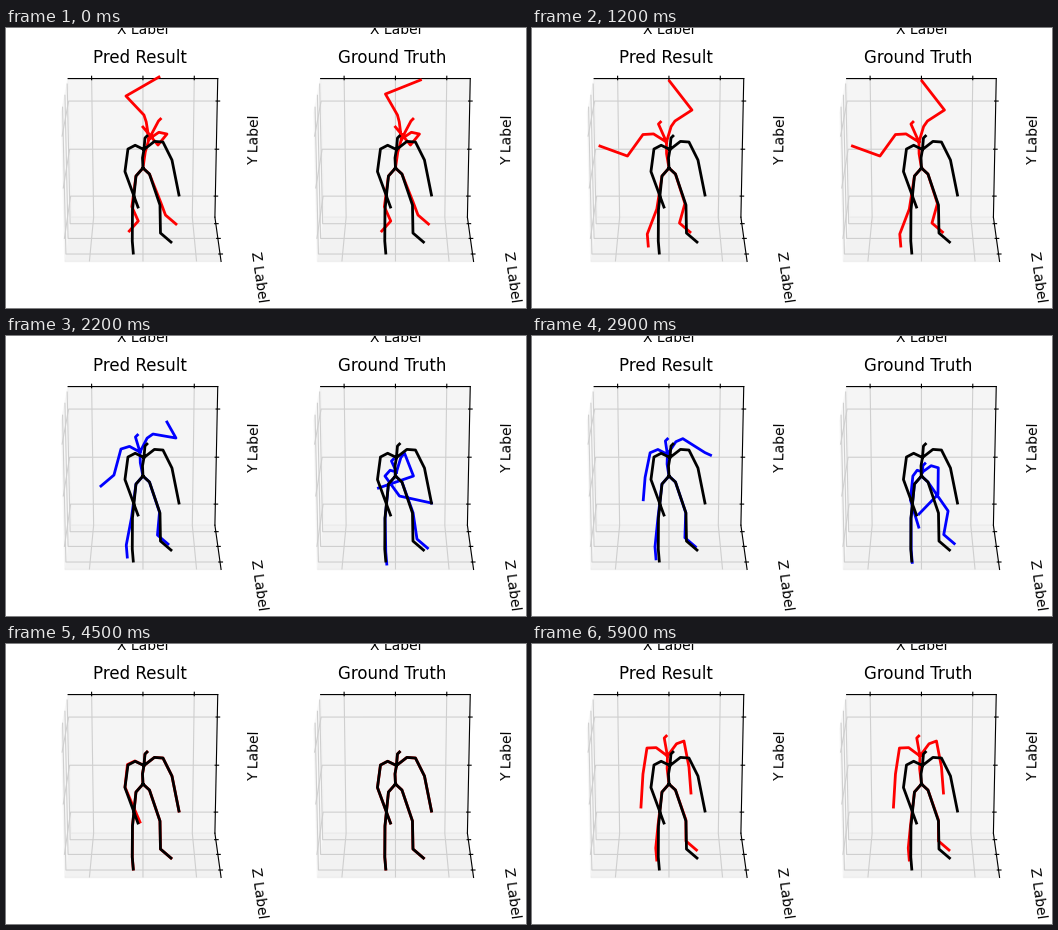
A matplotlib script that plays this animation: 520x280 px, repeating every 6 s.

```python
import numpy as np
import matplotlib.pyplot as plt
from matplotlib.animation import FuncAnimation

W, H, DPI = 520, 280, 100
FRAMES, INTERVAL = 60, 100
GAP = range(15, 45)              # the filled-in stretch, drawn blue

MARGIN, SIDE = 15, 237.5         # square panels, one margin apart
BOTTOM = 18
ELEV, AZIM = 110, -90.01
HALF = 76.4                      # half box width; one unit is one pixel
TICK = 0.686

plt.rcParams.update({"font.family": "DejaVu Sans", "grid.color": "#cfcfcf"})


def lerp(a, b, u):
    return np.asarray(a, float) * (1 - u) + np.asarray(b, float) * u


# ---- poses ----------------------------------------------------------------
# Control points relative to the hips, y up. An arm is shoulder, elbow, hand;
# steps move the feet away from the standing stance.
L_ARM, R_ARM = slice(2, 5), slice(5, 8)


def pose(chest, neck, l_arm, r_arm, l_step=(0, 0), r_step=(0, 0),
         l_heel=(0, 0), r_knee=(0, 0)):
    return np.array([chest, neck, *l_arm, *r_arm,
                     l_step, r_step, l_heel, r_knee], float)


def with_arm(base, arm, points):
    out = base.copy()
    out[arm] = points
    return out


target = pose((1, 18.5), (2, 30),
              [(-15, 19), (-18, -3.5), (-5, -39)],
              [(20, 26), (29, 8), (36, -27)])

raised = pose((6, 29), (15.5, 47),
              [(24, 34), (15, 23), (0, 41)],
              [(1, 53), (-17, 72), (16, 91)],
              l_step=(-4, 22), r_step=(5, 18), l_heel=(10, -2))
raised_true = with_arm(raised, R_ARM, [(2, 53), (-10, 74), (25, 88)])

swung = pose((-2.5, 26), (-10.5, 44),
             [(-26, 33.5), (-41.5, 12), (-69, 22)],
             [(6, 47), (23, 58), (0.5, 87)],
             l_step=(-11, 7), r_step=(-7, 10))

pred_mid = pose((-3, 24), (-7.5, 39),
                [(-22, 27), (-29, 1), (-42, -10)],
                [(10, 42), (33, 38), (24, 54)],
                l_step=(-6, 4), r_step=(-3, 6))
pred_late = with_arm(lerp(pred_mid, target, 0.75), R_ARM,
                     [(17, 33), (37, 14), (50, -5)])
pred_end = with_arm(target, L_ARM, [(-15.5, 19.5), (-18, -3), (-3, -38)])

true_mid = pose((1, 4), (-4, 15),
                [(-10.5, 0), (4, -20), (36, -27)],
                [(9, 23), (18, 0), (-17, -12)],
                l_step=(1, -3), r_step=(4, 2))
true_late = pose((1, 4), (4, 9),
                 [(-8, 0), (-23, -25), (-33.5, -61)],
                 [(22, 2), (16, -25), (16, -47)],
                 r_step=(5, 10), r_knee=(16, 2))

upright = pose((-1.5, 28), (-4.7, 46),
               [(-22, 36), (-26, 10), (-28, -23)],
               [(15, 43), (20, 17), (22, -9)],
               l_step=(-2.5, 9), r_step=(-0.5, 8))
rising = with_arm(lerp(target, upright, 0.65), L_ARM,
                  [(-20, 29), (-21, 7), (9, -16)])

LEAD = {7: lerp(raised, swung, 0.74), 12: swung,
        14: lerp(swung, pred_mid, 0.27)}
TAIL = {50: rising, 59: upright}
PRED_KEYS = {0: raised, **LEAD, 22: pred_mid, 35: pred_late,
             45: pred_end, **TAIL}
TRUE_KEYS = {0: raised_true, **LEAD, 22: true_mid, 35: true_late,
             45: target, **TAIL}


def smooth_track(keys):
    """Cubic path through the key poses that never overshoots them."""
    t = np.array(list(keys), float)
    p = np.array(list(keys.values()))
    step = np.diff(t)
    slope = np.diff(p, axis=0) / step[:, None, None]
    a, b = slope[:-1], slope[1:]
    same = a * b > 0
    tangent = np.zeros_like(p)
    tangent[1:-1] = np.where(same, 2 * a * b / np.where(same, a + b, 1), 0)
    tangent[0], tangent[-1] = slope[0], slope[-1]

    def at(n):
        i = min(np.searchsorted(t, n, side="right") - 1, len(t) - 2)
        h = step[i]
        u = (n - t[i]) / h
        ease = u * u * (3 - 2 * u)
        return (lerp(p[i], p[i + 1], ease)
                + h * u * (1 - u) ** 2 * tangent[i]
                - h * u * u * (1 - u) * tangent[i + 1])
    return at


# ---- skeleton -------------------------------------------------------------
HIPS, BREAK = np.zeros(2), np.full(2, np.nan)
L_LEG = np.array([(-7, -8), (-10.5, -42), (-10.7, -73), (-9.7, -85)])
R_LEG = np.array([(6.5, -6), (17, -37), (17.5, -65), (28, -74)])
FOLLOW = np.array([[0], [0.15], [1], [1]])   # hip, knee, ankle, toe


def arm_chain(chest, shoulder, elbow, hand):
    collar = lerp(chest, shoulder, 0.55) + (0, 4)
    wrist = lerp(elbow, hand, 0.68)
    return [chest, collar, shoulder, elbow, wrist, hand]


def bones(controls):
    """Joint path in box coordinates, on the plane facing the camera."""
    chest, neck = controls[:2]
    l_step, r_step, l_heel, r_knee = controls[8:]
    l_leg = L_LEG + FOLLOW * l_step
    r_leg = R_LEG + FOLLOW * r_step
    l_leg[2] += l_heel
    r_leg[1] += r_knee
    spine = 0.55 * chest + (-1, 0)
    path = np.array([HIPS, spine, chest, neck, neck + (2, 2), BREAK,
                     *arm_chain(chest, *controls[L_ARM]), BREAK,
                     *arm_chain(chest, *controls[R_ARM]), BREAK,
                     HIPS, *l_leg, BREAK, HIPS, *r_leg])
    x, up = path.T
    tilt = np.radians(ELEV - 90)
    return x, up * np.cos(tilt), -up * np.sin(tilt)


# ---- stage ----------------------------------------------------------------
fig = plt.figure(figsize=(W / DPI, H / DPI), dpi=DPI, facecolor="white")


def add_panel(column, title, keys):
    left = MARGIN + column * (SIDE + MARGIN)
    ax = fig.add_axes([left / W, BOTTOM / H, SIDE / W, SIDE / H],
                      projection="3d")
    ax.view_init(elev=ELEV, azim=AZIM)
    ax.set_title(title, y=1.0)
    for name, half in zip("xyz", (HALF, HALF, HALF * 0.75)):
        ticks = [-TICK * half, 0, TICK * half]
        ax.set(**{f"{name}ticks": ticks, f"{name}ticklabels": [],
                  f"{name}lim": (-half, half),
                  f"{name}label": f"{name.upper()} Label"})
    moving, = ax.plot(*bones(keys[0]), lw=2, zorder=4)
    ax.plot(*bones(target), color="black", lw=2, zorder=5)
    return moving, smooth_track(keys)


panels = [add_panel(0, "Pred Result", PRED_KEYS),
          add_panel(1, "Ground Truth", TRUE_KEYS)]


def update(n):
    color = "blue" if n in GAP else "red"
    for moving, track in panels:
        moving.set_data_3d(*bones(track(n)))
        moving.set_color(color)
    return [moving for moving, _ in panels]


anim = FuncAnimation(fig, update, frames=FRAMES, interval=INTERVAL,
                     init_func=lambda: update(0), repeat=True)
plt.show()
```
